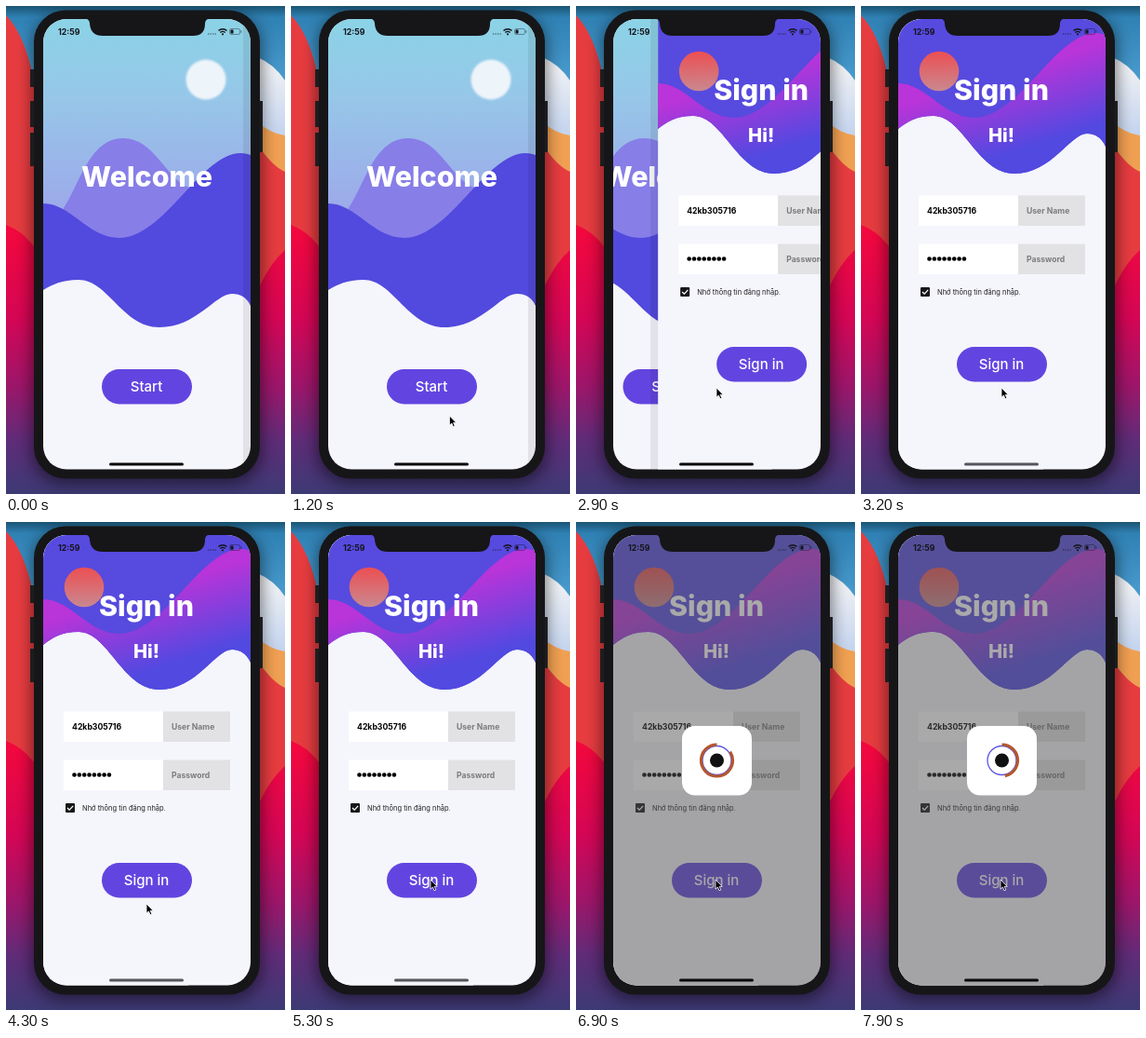
An HTML page that plays this animation: 300x524 px, repeating every 8000 ms.

```html
<!DOCTYPE html>
<html lang="en">
<head>
<meta charset="utf-8">
<style>
  html, body { margin: 0; width: 100%; height: 100%; overflow: hidden; }
  svg { display: block; width: 300px; height: 524px; font-family: Inter, "Noto Sans", sans-serif; }
  .title { font-size: 30.4px; font-weight: 800; fill: #fff; text-anchor: middle; }
  .label { font-size: 15px; font-weight: 500; fill: #fff; text-anchor: middle; }
  .field { font-size: 8.7px; font-weight: 700; }
  .hint { font-size: 8.6px; font-weight: 700; fill: #7b7b7f; }
</style>
</head>
<body>
<svg viewBox="0 0 300 524">
  <defs>
    <linearGradient id="blue" x2="0" y2="1"><stop stop-color="#1a5474"/><stop offset=".15" stop-color="#2f80b3"/><stop offset="1" stop-color="#4a9ccf"/></linearGradient>
    <linearGradient id="pale" x2="0" y2="1"><stop offset=".2" stop-color="#eef0f4"/><stop offset="1" stop-color="#c3d3ee"/></linearGradient>
    <linearGradient id="crimson" x2="0" y2="1"><stop stop-color="#f4083c"/><stop offset=".35" stop-color="#d40655"/><stop offset=".6" stop-color="#9c166a"/><stop offset=".8" stop-color="#5f2c78"/><stop offset="1" stop-color="#3c3a74"/></linearGradient>
    <linearGradient id="sky" x2="0" y2="1"><stop stop-color="#8bd3e6"/><stop offset=".4" stop-color="#96c7e8"/><stop offset="1" stop-color="#9da9ea"/></linearGradient>
    <linearGradient id="band" gradientUnits="userSpaceOnUse" x1="130" y1="80" x2="155" y2="160"><stop stop-color="#b934d9"/><stop offset="1" stop-color="#5149e0"/></linearGradient>
    <linearGradient id="planet" x2="0" y2="1"><stop stop-color="#ec4f52"/><stop offset="1" stop-color="#c98890"/></linearGradient>
    <clipPath id="screen"><rect x="40" y="14" width="223" height="483.500" rx="25"/></clipPath>
    <filter id="soft" x="-20%" y="-20%" width="140%" height="140%"><feGaussianBlur stdDeviation="8"/></filter>
    <filter id="glow"><feGaussianBlur stdDeviation="1"/></filter>
  </defs>

  <!-- wallpaper -->
  <rect width="300" height="524" fill="#e63c40"/>
  <path d="M150 60H300V178Q286 172 270 148Z" fill="#f0a052"/>
  <path d="M150 50H300V139Q284 137 270 124Z" fill="url(#pale)"/>
  <path d="M0 0H300V80Q288 62 270 55L30 80Q20 30 0 10Z" fill="url(#blue)"/>
  <path d="M0 235Q18 242 30 258L273 300Q285 275 300 262V524H0Z" fill="url(#crimson)"/>

  <!-- phone -->
  <rect x="27" y="8" width="249" height="506" rx="36" opacity=".45" filter="url(#soft)"/>
  <path d="M26 68h6v19h-6zM26 102h6v28h-6zM26 136h6v36h-6zM271 102h5v55h-5z" fill="#1d1d20"/>
  <rect x="30" y="4.500" width="243" height="503" rx="34" fill="#161618"/>

  <g clip-path="url(#screen)">
    <g id="welcome">
      <rect x="40" y="14" width="223" height="484" fill="#f5f5fc"/>
      <rect x="40" y="14" width="223" height="206" fill="url(#sky)"/>
      <circle cx="215" cy="79" r="21.5" fill="#edf4fa" filter="url(#glow)"/>
      <path d="M62 250V217C80 190 90 142 126 142C160 142 172 186 197 195V250Z" fill="#877ee8"/>
      <path d="M40 212C70 212 88 249 122 249C170 249 210 158 252 158Q258 158 263 160V322C258 311 250 309 243 309C225 309 205 345 165 345C125 345 110 294 78 294C60 294 50 299 40 305Z" fill="#5249de"/>
      <text class="title" x="151.5" y="194">Welcome</text>
      <rect x="103" y="390" width="97" height="37.500" rx="18.7" fill="#6245e0"/>
      <text class="label" x="151" y="414">Start</text>
    </g>

    <g id="signin">
      <rect x="32" y="14" width="8" height="484" opacity=".08"/>
      <rect x="40" y="14" width="223" height="484" fill="#f5f5fc"/>
      <path id="header" d="M40 14H263V151C258 140 250 137 243 137C225 137 205 180 165 180C125 180 110 118 78 118C60 118 50 124 40 132Z" fill="#574adf"/>
      <path d="M40 83C70 83 88 120 122 120C170 120 210 29 252 29Q258 29 263 31V151C258 140 250 137 243 137C225 137 205 180 165 180C125 180 110 118 78 118C60 118 50 124 40 132Z" fill="url(#band)"/>
      <circle cx="84" cy="70" r="21.300" fill="url(#planet)"/>
      <text class="title" x="151" y="100.500">Sign in</text>
      <text class="title" x="151" y="146" style="font-size:20.2px">Hi!</text>
      <path d="M62 203.500h107v32.500h-107zM62 255.500h107v32.500h-107z" fill="#fff"/>
      <path d="M169 203.500h72v32.500h-72zM169 255.500h72v32.500h-72z" fill="#e2e2e4"/>
      <text class="field" x="71" y="223">42kb305716</text>
      <text class="hint" x="178" y="223">User Name</text>
      <text class="hint" x="178" y="275">Password</text>
      <path d="M73.500 271.500H112" stroke="#000" stroke-width="4.7" stroke-linecap="round" stroke-dasharray="0 5.35"/>
      <rect x="64" y="302" width="10" height="10" rx="1" fill="#17171a"/>
      <path d="M66 307l2.200 2.200 4-4.400" fill="none" stroke="#fff" stroke-width="1.200"/>
      <text x="82" y="309.700" font-size="7.500" fill="#222">Nhớ thông tin đăng nhập.</text>
      <rect x="103" y="366" width="97" height="37.500" rx="18.7" fill="#6245e0"/>
      <text class="label" x="151" y="390">Sign in</text>
    </g>

    <g id="loading">
      <rect x="40" y="14" width="223" height="484" fill="#555" opacity=".5"/>
      <rect x="114" y="219" width="75" height="74.500" rx="14" fill="#fff"/>
      <circle cx="151.5" cy="256" r="15.500" fill="none" stroke="#5a55e0" stroke-width="1.300"/>
      <circle id="arc" cx="151.5" cy="256" r="17" pathLength="360" transform="rotate(-90 151.5 256)" fill="none" stroke="#b4572f" stroke-width="3.200"/>
      <circle id="dot" cy="256" fill="#111"/>
    </g>

    <!-- status bar and home indicator -->
    <path d="M84 13Q90 14 90 19Q91 32 104 32H201Q214 32 214 19Q214 14 220 13Z" fill="#161618"/>
    <g fill="#15151c">
      <text x="56" y="31" font-size="8.800" font-weight="700">12:59</text>
      <path d="M217 30H226" stroke="#15151c" stroke-opacity=".5" stroke-width="1.300" stroke-dasharray="1.300 1.200"/>
      <path d="M228.500 26.500a6.500 6.500 0 0 1 9 0M230.300 28.600a4 4 0 0 1 5.400 0" fill="none" stroke="#15151c" stroke-width="1.400"/>
      <circle cx="233" cy="30.300" r="1.100"/>
      <rect x="240.500" y="24.500" width="11" height="6" rx="1.700" fill="none" stroke="#15151c" stroke-opacity=".5" stroke-width=".8"/>
      <rect x="241.500" y="25.500" width="3" height="4" rx=".6"/>
      <rect x="252.400" y="26.300" width="1" height="2.400" opacity=".5"/>
      <rect id="home" x="111" y="490.500" width="80" height="3" rx="1.500"/>
    </g>
  </g>

  <path id="cursor" d="M0 0V10.200L2.400 8L4 11.800L5.800 11L4.200 7.400H7.300Z" stroke="#fff" stroke-width=".8"/>
</svg>
<script>
  const LOOP = 8000, STEP = 100, SPIN_START = 6000, SPIN = 1600;
  const $ = id => document.getElementById(id);
  const ramp = (t, from, to) => Math.min(1, Math.max(0, (t - from) / (to - from)));
  const smooth = p => p * p * (3 - 2 * p);
  const easeOut = p => 1 - (1 - p) ** 3;
  const show = (id, on) => $(id).setAttribute('visibility', on ? 'visible' : 'hidden');
  const move = (id, x, y = 0) => $(id).setAttribute('transform', `translate(${x} ${y})`);

  // The pointer glides in to Start, rests, then rises to Sign in.
  function drawCursor(t) {
    const enter = smooth(ramp(t, 800, 1400)), rise = smooth(ramp(t, 4900, 5300));
    move('cursor', 226 - 75 * enter - rise, 526 - 116 * enter - 26 * rise);
  }

  // The dot crosses the ring, largest in the middle, while the arc runs once around.
  function drawSpinner(t) {
    const phase = Math.max(0, t - SPIN_START) % SPIN;
    const enter = smooth(ramp(phase, 0, 300)), leave = smooth(ramp(phase, 1200, 1500));
    $('dot').setAttribute('cx', 151.5 + 29 * (enter - 1 + leave));
    $('dot').setAttribute('r', .5 + 7 * (enter - leave));

    const head = 360 * ramp(phase, 0, 640), tail = 360 * ramp(phase, 800, 1440);
    $('arc').setAttribute('stroke-dasharray', `0 ${tail} ${head - tail} 360`);
    show('arc', head > tail);
  }

  function draw(t) {
    const slide = easeOut(ramp(t, 2700, 3200));
    move('welcome', -67 * slide);
    move('signin', 223 * (1 - slide));
    $('home').setAttribute('fill', t >= 3100 && t < 5900 ? '#55555c' : '#08080a');

    const loading = ramp(t, 5800, 5950);
    $('loading').setAttribute('opacity', loading);
    drawSpinner(t);
    drawCursor(t);
  }

  function frame() {
    draw(Math.floor(performance.now() % LOOP / STEP) * STEP);
    requestAnimationFrame(frame);
  }
  frame();
</script>
</body>
</html>
```
